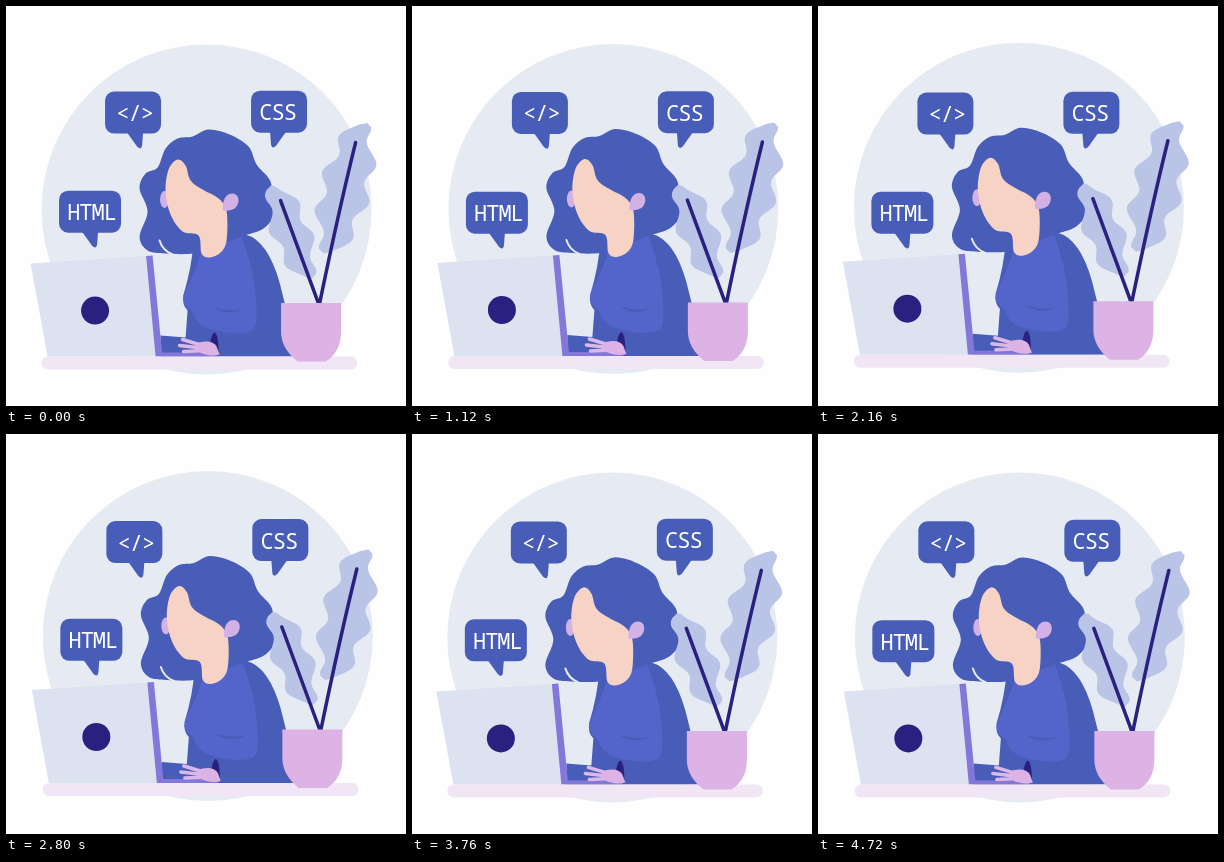
These frames come from a looping animation (400 by 400 pixels, 4800 ms). An HTML page:

```html
<!DOCTYPE html>
<html lang="en">
<head>
<meta charset="utf-8">
<style>
  html, body { margin: 0; height: 100%; overflow: hidden; background: #fefefe; }
  svg { display: block; width: 100vw; height: 100vh; }
  text { fill: #fff; font: 500 22px "Noto Sans Mono", "DejaVu Sans Mono", monospace; letter-spacing: -1px; text-anchor: middle; }
  .royal { fill: #485db7; }
  .shirt { fill: #5365cb; }
  .navy { fill: #2a2080; }
  .mist { fill: #e6eaf2; }
  .leaf { fill: #b9c4e7; }
  .skin { fill: #f6d3c5; }
  .ear { fill: #d3b1e5; }
  .pot { fill: #dcb3e4; }
  .desk { fill: #f1e6f6; }
  .lid { fill: #dde2f1; }
  .base { fill: #8378d9; }
  .line { fill: none; stroke-width: 3.5; stroke-linecap: round; }
  .stem { stroke: #2a2080; }
  .finger { stroke: #dcb8e8; }
  .gap { stroke: #e6eaf2; stroke-width: 2; }
</style>
</head>
<body>
<svg viewBox="0 0 400 400"></svg>
<script>
  const STEP = 80, LOOP = 4800;
  const svg = document.querySelector("svg");
  const path = (cls, d) => `<path class="${cls}" d="${d}"/>`;

  // Smooth closed curve through the given points.
  function blob(cls, text) {
    const pts = text.split(" ").map(pair => pair.split(",").map(Number));
    const at = i => pts[(i + pts.length) % pts.length];
    const handle = (i, k) => at(i).map((v, axis) => v + k * (at(i + 1)[axis] - at(i - 1)[axis]) / 6);
    const curves = pts.map((_, i) => `C${handle(i, 1)} ${handle(i + 1, -1)} ${at(i + 1)}`);
    return path(cls, `M${pts[0]}${curves.join("")}`);
  }

  // Leaf whose middle line snakes between base and tip.
  function leaf([bx, by], [tx, ty], { half, shift, wave, freq, crest }) {
    const length = Math.hypot(tx - bx, ty - by);
    const ux = (tx - bx) / length, uy = (ty - by) / length;
    const count = 80, pts = [];
    for (let i = 0; i < count; i++) {
      const side = i < count / 2 ? 1 : -1;
      const s = side > 0 ? 2 * i / count : 2 - 2 * i / count;
      const width = half * Math.sqrt(Math.abs(Math.sin(Math.PI * s)));
      const n = side * width + shift + wave * Math.cos(freq * (s - crest));
      pts.push([bx + ux * length * s - uy * n, by + uy * length * s + ux * n]);
    }
    return path("leaf", `M${pts.join("L")}Z`);
  }

  function bubble(id, label, x, y, width, tail, lean) {
    return `<g id="${id}">
      <rect class="royal" x="${x}" y="${y}" width="${width}" height="42" rx="9"/>
      ${path("royal", `M${x + tail} ${y + 41}l${lean * 10} 14q${lean * 4} 4 ${lean * 5} -1l${lean} -13Z`)}
      <text x="${x + width / 2 + lean * 1.5}" y="${y + 29.5}">${label}</text>
    </g>`;
  }

  const body =
    path("royal", "M188 235L240 228Q262 234 274 276L280 300L290 350H155V329L180 331L182 304Q176 298 178 288Q186 262 188 235Z") +
    path("shirt", "M196 244C191 262 184 276 178 288Q176 299 186 304Q190 317 202 322Q234 331 247 324Q253 318 250 290Q249 266 236 230Z") +
    path("royal", "M207 300Q223 306 240 302Q222 311 207 300Z");

  const head =
    blob("royal", "172,132 187,130 203,123 224,128 243,140 251,158 264,173 267,188 269,207 258,222 236,230 210,240 188,247 160,247 142,244 134,230 142,205 134,182 140,167 152,161 160,142") +
    path("line gap", "M154 234Q157 244 167 248") +
    `<ellipse class="ear" cx="159" cy="193" rx="4.5" ry="8.5"/>` +
    blob("skin", "172,153 163,163 160,185 165,208 177,225 193,229 196,247 204,251 215,246 221,234 221,205 213,192 197,183 185,174 180,159") +
    path("ear", "M217 204Q217 187 227 187C234 187 235 197 229 202Q224 205 217 204Z");

  const laptop =
    path("lid", "M25 257L140.5 249.5L150 350H42Z") +
    path("base", "M140.5 249.5L147 249L156.5 346H211V350H150Z") +
    `<circle class="navy" cx="89.5" cy="304" r="14"/>`;

  const hand =
    path("navy", "M204 340Q206 326 209 326Q213 328 213 346Z") +
    path("line finger", "M177 333L200 340M174 339L200 342M178 345L200 344") +
    path("pot", "M190 337Q206 332 211 340L214 348Q204 351 192 345Z");

  const plant =
    leaf([318, 247], [352, 114], { half: 22, shift: 5, wave: 5, freq: 22, crest: .72 }) +
    leaf([303, 273], [268, 178], { half: 17, shift: 0, wave: 4, freq: 17, crest: .39 }) +
    path("line stem", "M275 194L313 297M350 136Q333 205 314 297") +
    path("pot", "M275.5 296.5H335.5V326Q335 346 320 355H292Q275.5 342 275.5 325Z");

  svg.innerHTML = `<g id="scene">
      <circle class="mist" cx="201" cy="203" r="165"/>
      ${body}${head}${laptop}${hand}
      <rect class="desk" x="36" y="350" width="315.5" height="13" rx="6.2"/>
      ${plant}
    </g>` +
    bubble("code", "&lt;/&gt;", 99.5, 85.5, 56, 22, 1) +
    bubble("css", "CSS", 245.5, 85, 56, 35, -1) +
    bubble("html", "HTML", 53.5, 184.5, 62, 23, 1);

  // Everything sways sideways together; each layer bobs at its own pace.
  const wave = (t, amp, period, peak) => amp * Math.cos(2 * Math.PI * (t - peak) / period);
  const bob = {
    scene: t => wave(t, 1, 3.9, 4.25) - .3,
    code: t => wave(t, .9, 8, 4) + 1,
    css: t => wave(t, .7, 3.1, 1.9) + .2,
    html: t => wave(t, .8, 2.9, 1.65) + .9
  };

  function frame() {
    const t = Math.floor(performance.now() % LOOP / STEP) * STEP / 1000;
    const x = wave(t, .75, 2, .75) + .1;
    for (const id in bob) {
      document.getElementById(id).setAttribute("transform", `translate(${x} ${bob[id](t)})`);
    }
    requestAnimationFrame(frame);
  }
  frame();
</script>
</body>
</html>
```
